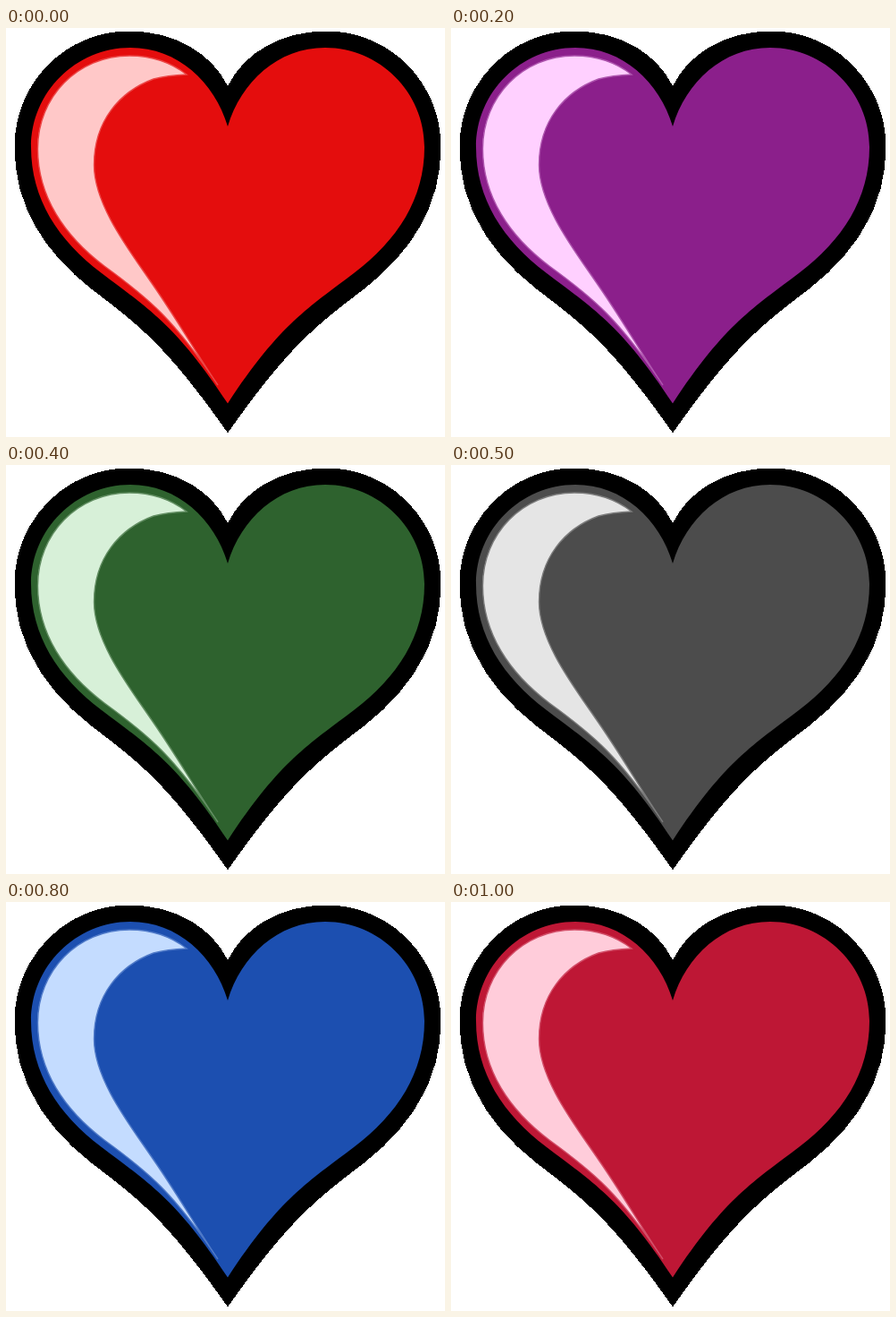
An HTML page for the animation above (1100 ms loop, 491 px wide and 457 px high).

```html
<!DOCTYPE html>
<html lang="en">
<head>
<meta charset="utf-8">
<title>Colour-changing heart</title>
<style>
html, body { margin: 0; width: 100%; height: 100%; overflow: hidden; background: #fff; }
svg { display: block; }
#body { fill: var(--body); }
#shine {
  fill: var(--light);
  stroke: color-mix(in srgb, var(--body) 70%, var(--light));
  stroke-width: 1.4;
}
</style>
</head>
<body>
<svg width="491" height="457" viewBox="0 0 491 457">
  <path shape-rendering="crispEdges" d="M248 65C230 28 189 3.5 137 3.5C67 3.5 9.5 61 9.5 133C9.5 198 42 250 96 292
    C150 333 180 356 248 452.5C316 356 346 333 400 292C454 250 486.5 198 486.5 133C486.5 61 429 3.5 359 3.5
    C307 3.5 266 28 248 65Z"/>
  <path id="body" d="M248 110C233 60 192 22 139 22C78 22 28 72 28 133C28 191 58 237 107 274C157 312 190 331 248 419.5
    C306 331 339 312 389 274C438 237 468 191 468 133C468 72 418 22 357 22C304 22 263 60 248 110Z"/>
  <path id="shine" d="M202 52C184 38 162 31 138 31C80 31 35.5 77 35.5 135C35.5 188 65 232 110 266C161 303 188 326 237 399
    C212 362 190 324 165 288C140 251 98.5 199 98.5 153C98.5 104 127 71 165 57Q180 53 202 52Z"/>
</svg>
<script>
// [start in ms, body colour, highlight colour]
const steps = [
  [0, '#e40d0d', '#ffc8c8'],
  [100, '#b8164c', '#ffcce4'],
  [200, '#8b1f8b', '#ffd0ff'],
  [300, '#0f7a0f', '#c8facb'],
  [400, '#2e622e', '#d7f0d8'],
  [500, '#4c4c4c', '#e5e5e5'],
  [700, '#02982d', '#a8ffdc'],
  [800, '#1c4fb0', '#c4dcff'],
  [900, '#ca046d', '#ffc8f4'],
  [1000, '#be1735', '#ffccda']
];
const loop = 1100;
const root = document.documentElement.style;
const begin = performance.now();

function draw() {
  const time = (performance.now() - begin) % loop;
  const [, body, light] = steps.findLast(([start]) => start <= time);
  root.setProperty('--body', body);
  root.setProperty('--light', light);
  requestAnimationFrame(draw);
}
draw();
</script>
</body>
</html>
```
